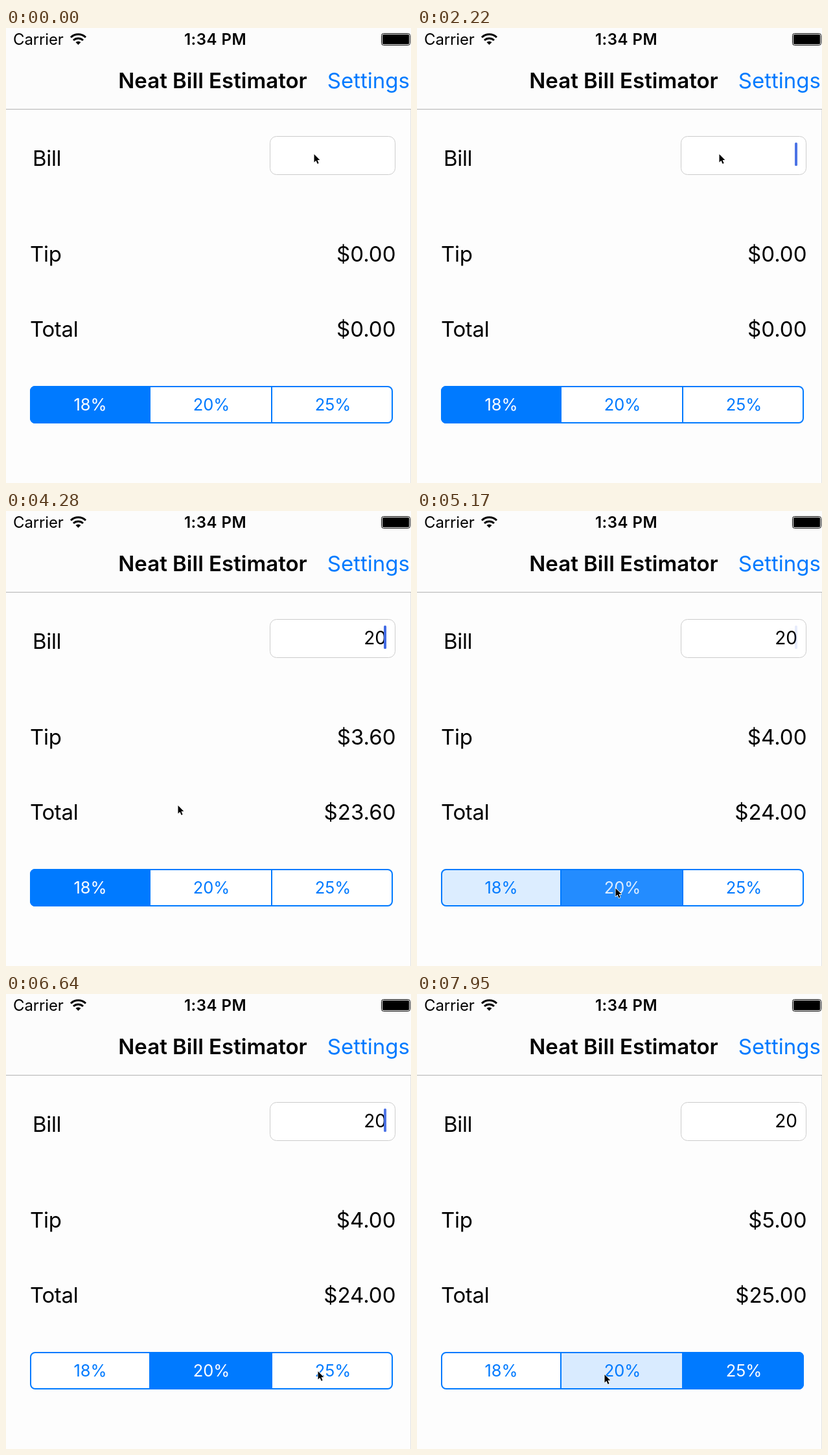
Animation, 625 px wide and 703 px high, one loop 8000 ms. Source, as an HTML page:

```html
<!DOCTYPE html>
<html lang="en">
<head>
<meta charset="utf-8">
<title>Bill estimator</title>
<style>
  html, body { margin: 0; width: 100%; height: 100%; overflow: hidden; background: #fdfdfd; }
  svg { display: block; width: 625px; height: 703px; }
  text { font: 400 33px Inter, "Open Sans", sans-serif; letter-spacing: -.01em; white-space: pre; }
  .title { font-weight: 600; letter-spacing: 0; }
  .status { font-size: 24px; letter-spacing: -.005em; }
  .clock { font-weight: 600; letter-spacing: .02em; }
  .field { font-size: 28px; }
  .option { font-size: 25.5px; letter-spacing: 0; }
  .middle { text-anchor: middle; }
  .end { text-anchor: end; letter-spacing: 0; }
</style>
</head>
<body>
<svg viewBox="0 0 625 703">
  <rect width="625" height="125" fill="#fcfcfc"/>
  <path d="M0 125.5H625" stroke="#b2b2b2"/>
  <path d="M624.5 126V703" stroke="#e2e2e2"/>

  <text class="status" x="11" y="26">Carrier</text>
  <g fill="none" stroke="#000" stroke-width="3">
    <path d="M100 14.5A16.5 16.5 0 0 1 123 14.5M104 19A11 11 0 0 1 119 19"/>
    <path d="M107.5 22L111.5 26L115.5 22Q111.5 19 107.5 22Z" fill="#000" stroke="none"/>
  </g>
  <text class="status clock middle" x="323" y="26">1:34 PM</text>
  <rect x="579.5" y="8.5" width="44" height="18" rx="3" fill="none" stroke="#000"/>
  <rect x="581" y="10" width="41" height="15" rx="1.5"/>

  <text class="title middle" x="319" y="93">Neat Bill Estimator</text>
  <text class="end" x="623" y="93" fill="#007aff">Settings</text>

  <text x="41" y="213">Bill</text>
  <text x="37" y="361">Tip</text>
  <text x="37" y="477">Total</text>
  <rect x="407.5" y="167.5" width="193" height="59" rx="10" fill="#fff" stroke="#ccc"/>
  <text id="bill" class="field end" x="587" y="206"></text>
  <rect id="caret" x="583" y="177" width="4" height="36" rx="1.5" fill="#426be4"/>
  <text id="tip" class="end" x="601.5" y="361"></text>
  <text id="total" class="end" x="601.5" y="477"></text>

  <clipPath id="pill"><rect x="37" y="553" width="560" height="58" rx="8"/></clipPath>
  <rect x="38" y="554" width="558" height="56" rx="7" fill="#fff"/>
  <g id="fills" fill="#007aff" clip-path="url(#pill)">
    <rect x="37" y="553" width="185" height="58"/>
    <rect x="222" y="553" width="188" height="58"/>
    <rect x="410" y="553" width="187" height="58"/>
  </g>
  <g fill="none" stroke="#007aff" stroke-width="2">
    <rect x="38" y="554" width="558" height="56" rx="7"/>
    <path d="M222 554V610M410 554V610"/>
  </g>
  <g id="options">
    <text class="option middle" x="130" y="591">18%</text>
    <text class="option middle" x="317" y="591">20%</text>
    <text class="option middle" x="504.5" y="591">25%</text>
  </g>

  <path id="pointer" d="M.5 1V13.5L3.4 10.8L5.6 15.8L7.6 15L5.5 10.1H9.3Z"
        stroke="#fff" stroke-width="1.6" stroke-linejoin="round" paint-order="stroke"/>
</svg>
<script>
  const LOOP = 8000, TICK = 147.6;
  const $ = id => document.getElementById(id);
  const ramp = (t, from, to) => Math.min(1, Math.max(0, (t - from) / (to - from)));
  const money = value => "$" + value.toFixed(2);

  // time, x, y of the pointer tip
  const route = [
    [150, 475, 194], [440, 479, 191], [1600, 479, 191], [1920, 466, 194],
    [3550, 466, 194], [3700, 455, 212], [4000, 340, 350], [4280, 265, 454],
    [4570, 280, 545], [4730, 302, 578], [4870, 306, 582], [5320, 306, 582],
    [5900, 487, 583], [6340, 481, 582], [6790, 481, 582], [7080, 470, 600],
    [7300, 420, 628], [7660, 292, 590], [7950, 289, 587]
  ];

  function pointerAt(t) {
    const i = route.findIndex(stop => stop[0] >= t);
    if (i < 1) return (i ? route[route.length - 1] : route[0]).slice(1);
    const [t0, x0, y0] = route[i - 1], [t1, x1, y1] = route[i];
    const k = ramp(t, t0, t1);
    return [x0 + (x1 - x0) * k, y0 + (y1 - y0) * k];
  }

  function caretAt(t) {
    if (t < 140) return 0;
    if (t > 3000 && t < 3300) return 1;
    const phase = (t - (t < 3000 ? 100 : 150)) % 1000;
    return ramp(phase, 0, 120) * (1 - ramp(phase, 480, 670));
  }

  function draw(t) {
    const bill = t < 3000 ? "" : t < 3150 ? "2" : "20";
    const rate = t < 5000 ? .18 : t < 6900 ? .2 : .25;
    $("bill").textContent = bill;
    $("tip").textContent = money(bill * rate);
    $("total").textContent = money(bill * (1 + rate));
    $("caret").setAttribute("opacity", caretAt(t));

    const second = ramp(t, 4950, 5200), third = ramp(t, 6850, 7100);
    const pressed = t > 7800 ? .15 : 0;
    [1 - second, second - third + pressed, third].forEach((level, i) => {
      $("fills").children[i].setAttribute("opacity", level);
      const white = level > .3 ? level : 0;
      $("options").children[i].setAttribute("fill",
        `rgb(${255 * white}, ${122 + 133 * white}, 255)`);
    });

    $("pointer").setAttribute("transform", `translate(${pointerAt(t).map(Math.round)})`);
  }

  const start = performance.now();
  function loop() {
    const t = (performance.now() - start) % LOOP;
    draw(Math.floor((t + 15) / 147.4) * TICK);
    requestAnimationFrame(loop);
  }
  loop();
</script>
</body>
</html>
```
